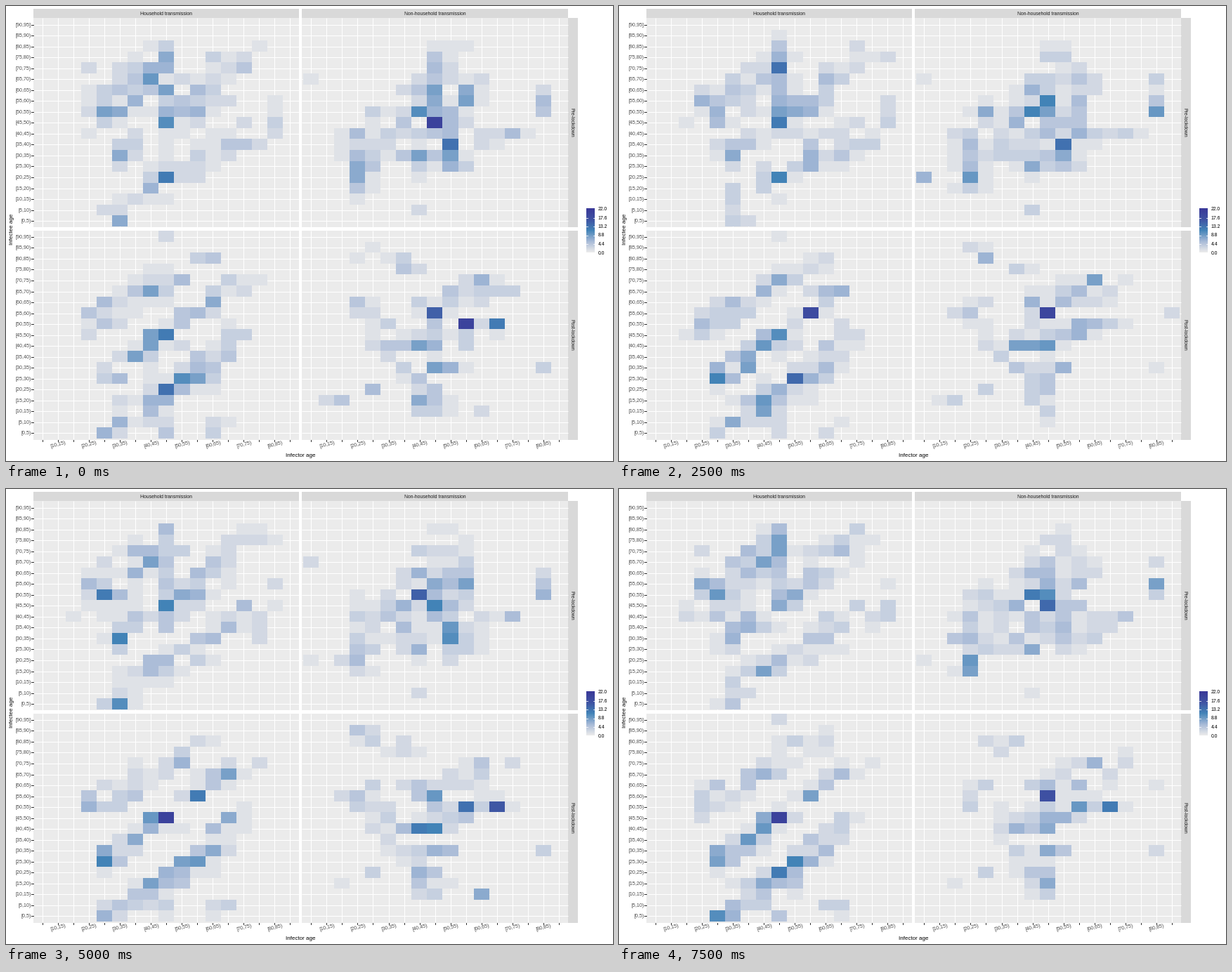
A matplotlib script for the animation above (8 s loop, 864 by 648 pixels).

```python
import numpy as np
import matplotlib.pyplot as plt
from matplotlib.animation import FuncAnimation
from matplotlib.colors import LinearSegmentedColormap
from matplotlib.patches import Rectangle

W, H = 864, 648
STEPS = 16
COLS, ROWS = 17, 19          # infector ages from 5, infectee ages from 0
DX, DY = 22.02, 15.53
TOP = 22.0
GREY = "#ebebeb"

plt.rcParams["font.family"] = "Liberation Sans"
cmap = LinearSegmentedColormap.from_list("cases", [
    (0, GREY), (0.25, "#a6b9d7"), (0.5, "#4384b8"),
    (0.75, "#3f53a3"), (1, "#3a3999")])

# Contact ridges: from (infector, infectee) to (infector, infectee), width, mean
# Hot spots: infector, infectee, mean
HOME_PRE = dict(
    ridges=[(22, 47, 38, 66, 5, 3.8), (45, 40, 45, 80, 2.5, 5),
            (50, 50, 60, 62, 4, 3.6), (60, 67, 72, 75, 4, 2.8),
            (52, 25, 70, 35, 4, 3), (60, 42, 70, 35, 3, 3),
            (40, 16, 50, 24, 4, 3.2), (30, 2, 36, 14, 3, 2.5),
            (30, 30, 35, 36, 3, 5), (80, 40, 80, 55, 2, 1.5)],
    spots=[(45, 70, 8), (25, 50, 7), (45, 45, 9), (30, 30, 11), (55, 30, 7),
           (45, 20, 6), (30, 0, 7), (70, 45, 3.5), (20, 70, 2)])
AWAY_PRE = dict(
    ridges=[(40, 49, 50, 47, 3.5, 9), (35, 45, 50, 40, 3.5, 5),
            (40, 58, 55, 62, 4, 4), (46, 65, 50, 77, 4, 2.2),
            (50, 25, 50, 45, 2.5, 7), (40, 25, 40, 37, 2.5, 5),
            (25, 30, 55, 32, 4, 3.3), (20, 15, 20, 40, 2.5, 3.6),
            (25, 50, 30, 40, 3, 3), (80, 50, 80, 62, 2, 3.4),
            (55, 35, 70, 39, 3, 1.8)],
    spots=[(20, 20, 6), (45, 55, 10), (70, 40, 4.5), (5, 20, 1.8),
           (5, 65, 1.8), (55, 55, 4.5), (40, 5, 2.4)])
HOME_POST = dict(
    ridges=[(25, 0, 30, 5, 2, 4.2), (36, 10, 54, 25, 4, 4),
            (57, 29, 66, 45, 3.2, 4), (25, 25, 45, 43, 3, 4),
            (50, 50, 64, 66, 3, 2.6), (25, 54, 45, 70, 3.5, 4),
            (20, 47, 28, 54, 3.2, 2.6), (45, 77, 60, 80, 3, 1.7),
            (65, 70, 75, 70, 2, 1.7), (60, 0, 65, 5, 2.5, 1.8),
            (45, 0, 45, 5, 2, 2)],
    spots=[(45, 45, 15), (55, 55, 14), (40, 65, 8), (65, 65, 7), (35, 35, 8),
           (50, 25, 9), (40, 45, 6.5), (45, 20, 7), (45, 90, 1.4)])
AWAY_POST = dict(
    ridges=[(50, 50, 65, 50, 2, 7), (40, 45, 55, 46, 3, 4),
            (30, 40, 45, 41, 2.5, 5), (35, 30, 50, 30, 2.2, 4.8),
            (40, 25, 45, 10, 3, 4), (50, 62, 65, 68, 4, 3.2),
            (40, 60, 45, 55, 2.2, 6), (22, 58, 28, 47, 3, 1.8),
            (20, 85, 36, 76, 2.5, 1.5), (10, 15, 15, 15, 2, 1.5),
            (80, 60, 85, 55, 2, 1.3)],
    spots=[(55, 50, 12), (45, 40, 8), (25, 20, 3), (60, 10, 2.3),
           (45, 20, 4), (15, 55, 1.9), (80, 30, 1.7), (60, 70, 5)])


def sample(ridges, spots, rng):
    """Poisson counts for every step, shape (STEPS, ROWS, COLS)."""
    src, dst = np.meshgrid(5 * np.arange(1, COLS + 1), 5 * np.arange(ROWS))
    mean = np.zeros((ROWS, COLS))
    for x0, y0, x1, y1, width, peak in ridges:
        vx, vy = x1 - x0, y1 - y0
        t = ((src - x0) * vx + (dst - y0) * vy) / (vx * vx + vy * vy)
        t = np.clip(t, 0, 1)
        dist = np.hypot(src - x0 - t * vx, dst - y0 - t * vy)
        mean = np.maximum(mean, peak * np.exp(-(dist / width) ** 2 / 2))
    mean[mean < .3] = 0
    mean *= rng.gamma(5, .2, mean.shape)
    for x, y, peak in spots:
        mean[y // 5, x // 5 - 1] = peak
    return np.ma.masked_equal(rng.poisson(mean, (STEPS, ROWS, COLS)), 0)


fig = plt.figure(figsize=(W / 72, H / 72), dpi=72, facecolor="white")
ax = fig.add_axes([0, 0, 1, 1])
ax.axis("off")


def box(x0, y0, x1, y1, color):
    ax.add_patch(Rectangle((x0, y0), x1 - x0, y1 - y0, color=color, lw=0))


def label(x, y, text, size=6.9, color="#1a1a1a", ha="center", rotation=0):
    ax.text(x, y, text, size=size, color=color, ha=ha, va="center",
            rotation=rotation)


def band(age):
    return f"[{age},{age + 5}" + ("]" if age == 90 else ")")


def panel(x, y, counts):
    """Panel whose lowest-age cell is centred on (x, y)."""
    xs = x + DX * np.arange(COLS)
    ys = y - DY * np.arange(ROWS)
    left, right = xs[0] - .6 * DX, xs[-1] + .6 * DX
    top, bottom = ys[-1] - .6 * DY, ys[0] + .6 * DY
    box(left, top, right, bottom, GREY)
    ax.hlines(ys, left, right, color="white", lw=1, zorder=2)
    ax.vlines(xs, top, bottom, color="white", lw=1, zorder=2)
    return ax.imshow(counts[0], cmap=cmap, vmin=0, vmax=TOP, origin="lower",
                     extent=(xs[0] - DX / 2, xs[-1] + DX / 2,
                             ys[0] + DY / 2, ys[-1] - DY / 2),
                     interpolation="nearest", aspect="auto", zorder=3)


X0, Y0 = (51.9, 434.4), (306.1, 608.4)
rng = np.random.default_rng(11)
panels = []
for k, model in enumerate((HOME_PRE, AWAY_PRE, HOME_POST, AWAY_POST)):
    counts = sample(**model, rng=rng)
    panels.append((panel(X0[k % 2], Y0[k // 2], counts), counts))

# Facet strips
for x, name in zip(X0, ("Household", "Non-household")):
    box(x - .6 * DX, 3.5, x + 16.6 * DX, 17, "#d9d9d9")
    label(x + 8 * DX, 11.5, name + " transmission", 6.85)
for y, name in zip(Y0, ("Pre-lockdown", "Post-lockdown")):
    box(800.2, y - 18.6 * DY, 813.5, y + .6 * DY, "#d9d9d9")
    label(804.5, y - 9 * DY, name, 6.85, rotation=-90)

# Axes
for y in Y0:
    for k in range(ROWS):
        ax.plot([36, 39], [y - k * DY] * 2, color="#333333", lw=1)
        label(35.5, y - k * DY + .5, band(5 * k), 7.1, "#4d4d4d", "right")
for x in X0:
    for k in range(COLS):
        ax.plot([x + k * DX] * 2, [617.5, 620], color="#333333", lw=1)
        if k % 2:
            label(x + k * DX + .9, 625, band(5 * k + 5), 7.1, "#4d4d4d",
                  rotation=15)
label(419, 640.5, "Infector age", 8, "black")
label(8.8, 318, "Infectee age", 8, "black", rotation=90)

# Colour bar
ax.imshow(np.linspace(0, 1, 63)[:, None], cmap=cmap, vmin=0, vmax=1,
          origin="lower", extent=(826, 838, 351.5, 289), aspect="auto")
for k in range(6):
    y = 351.5 - 12.5 * k
    if 0 < k < 5:
        for x in (826, 835.6):
            ax.plot([x, x + 2.4], [y, y], color="white", lw=.8, zorder=4)
    label(842.7, y + .5, f"{4.4 * k:.1f}", 6.9, "black", "left")

ax.set_xlim(0, W)
ax.set_ylim(H, 0)


def update(step):
    for image, counts in panels:
        image.set_data(counts[step])
    return [image for image, _ in panels]


anim = FuncAnimation(fig, update, frames=STEPS, interval=500, repeat=True,
                     repeat_delay=0)
plt.show()
```
